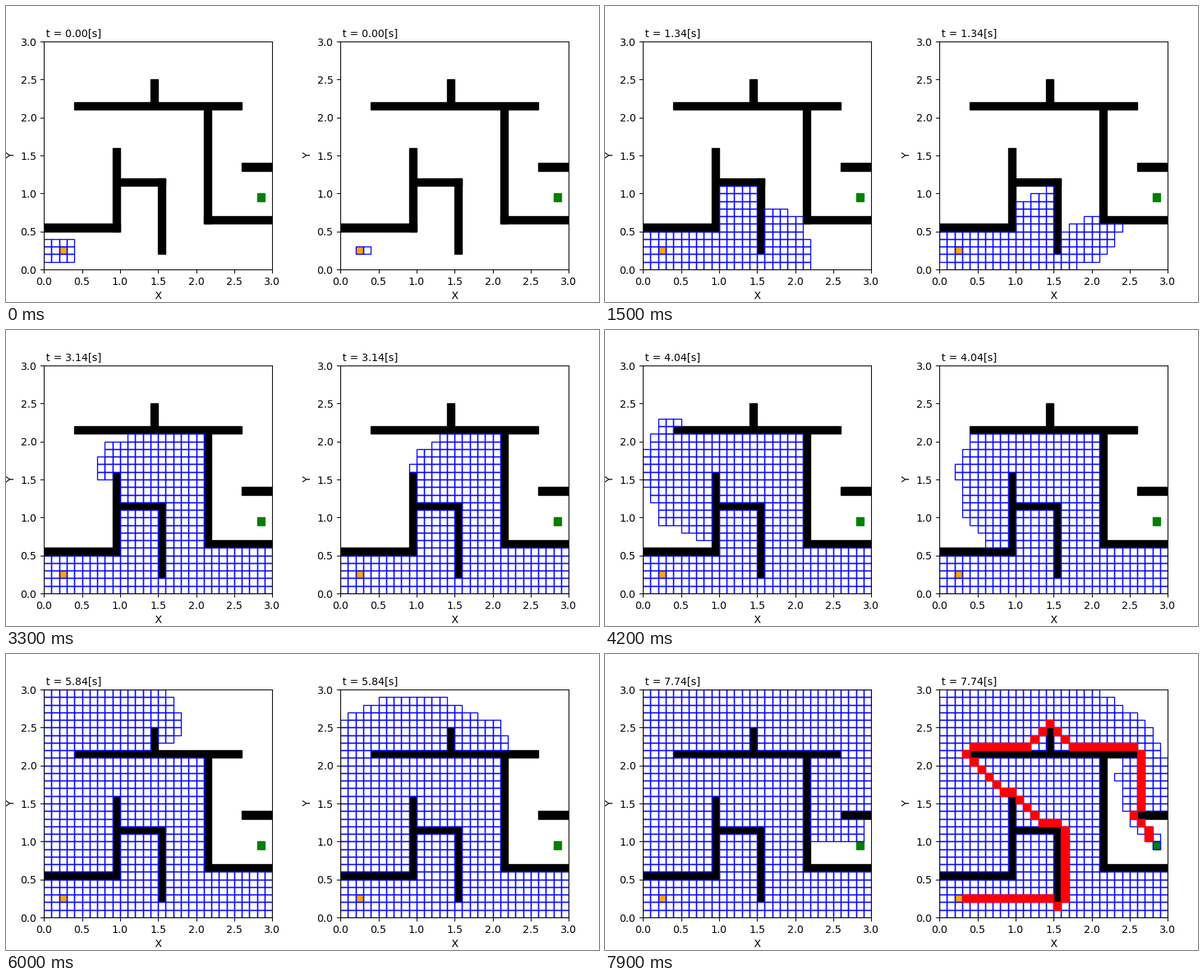
Write a matplotlib script that moves like this. It is 800 by 400 pixels and loops after 8000 ms.

```python
from itertools import product
from math import hypot

import matplotlib.pyplot as plt
from matplotlib.animation import FuncAnimation
from matplotlib.collections import PolyCollection
from matplotlib.patches import Rectangle

SIZE, CELL = 30, 0.1
START, GOAL = (2, 2), (28, 9)
FRAMES, INTERVAL = 80, 100

# Walls as x, y, width, height in cells.
WALLS = [
    (0, 5, 10, 1), (9, 5, 1, 11), (10, 11, 6, 1), (15, 2, 1, 10),
    (21, 6, 9, 1), (21, 6, 1, 15), (4, 21, 22, 1), (14, 22, 1, 3),
    (26, 13, 4, 1),
]
blocked = {(x + i, y + j) for x, y, w, h in WALLS
           for i, j in product(range(w), range(h))}


def neighbours(cell):
    for dx, dy in product((-1, 0, 1), repeat=2):
        x, y = cell[0] + dx, cell[1] + dy
        if (dx or dy) and 0 <= x < SIZE and 0 <= y < SIZE and (x, y) not in blocked:
            yield (x, y), hypot(dx, dy)


def search(weight):
    """Return cells in closing order, the step each was opened, and the path."""
    def score(cell):
        h = hypot(GOAL[0] - cell[0], GOAL[1] - cell[1])
        return round(cost[cell] + weight * h, 6), cell

    cost, parent, opened = {START: 0.0}, {}, {START: 0}
    frontier, closed = {START}, []
    done = set()
    while frontier:
        cell = min(frontier, key=score)
        frontier.remove(cell)
        closed.append(cell)
        done.add(cell)
        if cell == GOAL:
            break
        for nxt, step in neighbours(cell):
            new = cost[cell] + step
            if nxt not in done and new < cost.get(nxt, 1e9) - 1e-9:
                cost[nxt], parent[nxt] = new, cell
                opened.setdefault(nxt, len(closed))
                frontier.add(nxt)

    path, cell = [], parent[GOAL]
    while cell != START:
        path.append(cell)
        cell = parent[cell]
    return closed, opened, path


def square(cell):
    x, y = cell[0] * CELL, cell[1] * CELL
    return [(x, y), (x + CELL, y), (x + CELL, y + CELL), (x, y + CELL)]


def fill(ax, x, y, color, w=1, h=1):
    ax.add_patch(Rectangle((x * CELL, y * CELL), w * CELL, h * CELL, color=color))


def make_panel(left):
    ax = fig.add_axes([left / 800, 0.11, 0.385, 0.77])
    ax.set(xlim=(0, 3), ylim=(0, 3), xlabel="X", ylabel="Y")
    for x, y, w, h in WALLS:
        fill(ax, x, y, "black", w, h)
    fill(ax, *START, "orange")
    fill(ax, *GOAL, "green")
    grid = PolyCollection([], facecolors="none", edgecolors="blue",
                          linewidths=1, zorder=1.1)
    trail = PolyCollection([], facecolors="red", edgecolors="red",
                           linewidths=1, zorder=1.2)
    ax.add_collection(grid, autolim=False)
    ax.add_collection(trail, autolim=False)
    label = ax.text(0.01, 1.02, "", transform=ax.transAxes)
    return grid, trail, label


plain_closed, plain_opened, plain_path = search(0)
guided_closed, _, guided_path = search(0.9)

fig = plt.figure(figsize=(8, 4), dpi=100)
panels = [make_panel(51.2), make_panel(451.2)]


def draw(frame):
    ticks = max(0, 10 * frame - 16)
    count = ticks + 2
    views = [
        ([c for c, k in plain_opened.items() if k <= count],
         plain_path if count >= len(plain_closed) else []),
        (guided_closed[:count],
         guided_path if count >= len(guided_closed) else []),
    ]
    for (grid, trail, label), (cells, path) in zip(panels, views):
        grid.set_verts([square(c) for c in cells])
        trail.set_verts([square(c) for c in path])
        label.set_text(f"t = {ticks / 100:.2f}[s]")
    return [artist for panel in panels for artist in panel]


anim = FuncAnimation(fig, draw, frames=FRAMES, interval=INTERVAL,
                     repeat=True, repeat_delay=0, blit=False)
plt.show()
```
